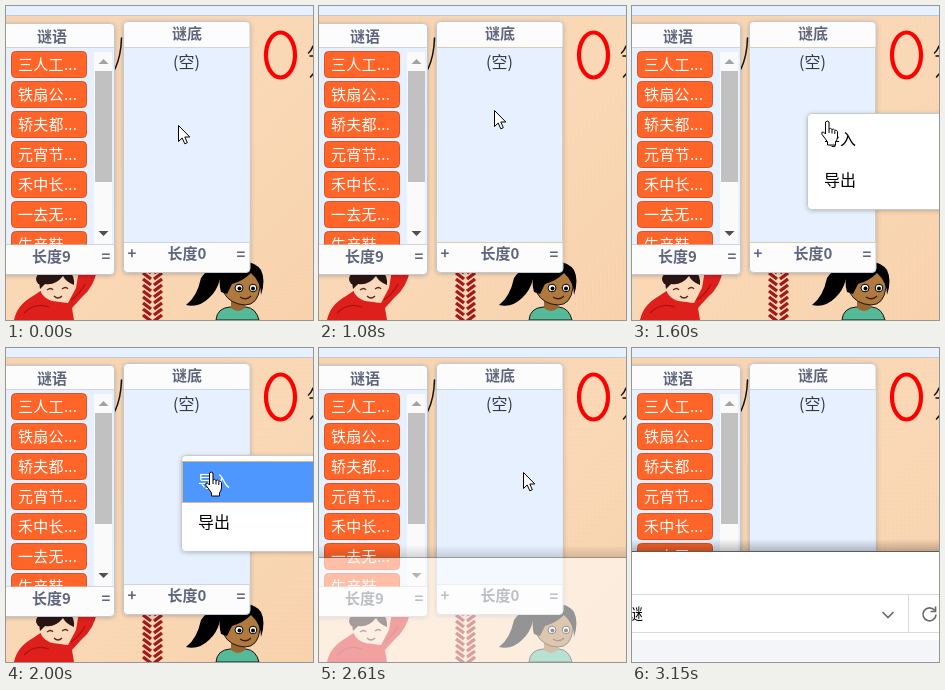
Recreate the animation shown at these times as an HTML page. Size 307x314 px, loop 8000 ms.

```html
<!DOCTYPE html>
<html lang="zh-CN">
<head>
<meta charset="utf-8">
<title>列表导入</title>
<style>
html, body { margin: 0; width: 100%; height: 100%; overflow: hidden; }
svg { display: block; width: 307px; height: 314px; }
text { font-family: "Noto Sans CJK SC", "Noto Sans CJK", "Liberation Sans", sans-serif; }
.title { font-size: 15px; font-weight: 700; fill: #5f667c; text-anchor: middle; }
.item { font-size: 15px; fill: #fff; letter-spacing: .3px; }
.menu { font-size: 16px; }
</style>
</head>
<body>
<svg viewBox="0 0 307 314" xmlns="http://www.w3.org/2000/svg">
  <defs>
    <linearGradient id="paper" x2="1" y2="1">
      <stop offset="0" stop-color="#f8d5b1"/>
      <stop offset=".55" stop-color="#fad9b8"/>
      <stop offset="1" stop-color="#f8d3ae"/>
    </linearGradient>
    <pattern id="weave" width="4" height="4" patternUnits="userSpaceOnUse">
      <path d="M0 .5H4M.5 0V4" stroke="#e9b98d" stroke-opacity=".08"/>
    </pattern>
    <linearGradient id="shade" x2="0" y2="1">
      <stop offset="0" stop-opacity="0"/>
      <stop offset="1" stop-opacity=".26"/>
    </linearGradient>
    <filter id="soft" x="-10%" y="-10%" width="120%" height="120%">
      <feDropShadow dx="0" dy="1" stdDeviation="2" flood-opacity=".22"/>
    </filter>
    <clipPath id="list"><rect y="42" width="108" height="196.5"/></clipPath>
  </defs>

  <rect width="307" height="314" fill="url(#paper)"/>
  <rect width="307" height="314" fill="url(#weave)"/>
  <rect width="307" height="9" fill="#e6f0ff"/>
  <path d="M0 9.5H307" stroke="#c3c8d2"/>

  <path d="M115.500 32Q115 50 109 63M307 40Q305 45 302.500 47M307 50H304M307 68L304.500 71"
    fill="none" stroke="#15110f" stroke-width="1.500" stroke-linecap="round"/>
  <ellipse cx="274.500" cy="49" rx="14.500" ry="22.500" fill="none" stroke="#f00" stroke-width="4.200"/>

  <!-- child in red -->
  <g>
    <path d="M8 314Q11 299 27 290L36 284Q42 296 62 297L70 282 73 264H91Q88 281 76 291L66 302 68 314Z" fill="#df1f1b"/>
    <ellipse cx="51" cy="281" rx="17" ry="14.500" fill="#fbd9bd"/>
    <path d="M34 283Q31 268 42 263H62Q69 270 68 279Q60 276 57 270Q49 280 39 278Z" fill="#2a1512"/>
    <circle cx="36" cy="273" r="6" fill="#2a1512"/>
    <path d="M41 284q4-3 6 0M56 283q4-3 6 0M48 290q4 4 8 0" fill="none" stroke="#5a2a1c" stroke-width="1.300"/>
    <path d="M18 307Q29 296 43 301M65 294Q74 288 79 278" fill="none" stroke="#a5140f" stroke-width="1.200"/>
  </g>

  <g id="braid" fill="none" stroke="#a01a1c" stroke-width="3.400"></g>

  <!-- girl -->
  <g>
    <path d="M219 264Q202 260 195 272Q191 291 180 299Q193 302 203 292Q211 285 214 273L222 277Z"/>
    <path d="M210 314Q211 302 224 301H240Q250 302 253 314Z" fill="#55ba98" stroke="#1b1512"/>
    <path d="M225 293L225 302Q232 308 239 302V296Z" fill="#996631"/>
    <path d="M217 276Q222 261 239 262Q255 266 254 281Q252 299 239 299Q224 298 218 287Z" fill="#b07a3f" stroke="#1b1512"/>
    <path d="M215 286Q209 264 228 258Q246 252 255 264Q260 274 255 289Q255 276 245 267Q237 275 226 278L221 288Z"/>
    <ellipse cx="233" cy="282" rx="4" ry="3.800" fill="#fff" stroke="#000"/>
    <ellipse cx="247" cy="282" rx="3.800" ry="3.800" fill="#fff" stroke="#000"/>
    <circle cx="233.500" cy="282.500" r="2"/>
    <circle cx="247" cy="282.500" r="2"/>
    <path d="M234 291q6 4 11-1" fill="none" stroke="#3c1c10" stroke-width="1.300"/>
  </g>

  <!-- left list -->
  <g>
    <rect x="-6" y="17.500" width="114.500" height="251" rx="4" fill="#fcfcfd" stroke="#bfc9d8" filter="url(#soft)"/>
    <rect y="42" width="108" height="196.500" fill="#e6f0ff"/>
    <path d="M0 41.500H108M0 238.500H108" stroke="#cdd5e1"/>
    <g id="items" clip-path="url(#list)"></g>
    <rect x="88" y="46" width="18" height="192" fill="#fafafa"/>
    <rect x="89" y="65" width="17" height="111" fill="#c1c1c1"/>
    <path d="M92.500 58L97.500 53 102.500 58Z" fill="#a3a3a3"/>
    <path d="M92.500 225L97.500 230 102.500 225Z" fill="#505050"/>
    <text class="title" x="46" y="35.500">谜语</text>
    <text class="title" x="45.500" y="256">长度9</text>
    <text class="title" x="100" y="256">=</text>
  </g>

  <!-- right list -->
  <g>
    <rect x="117.500" y="15.500" width="126.500" height="251" rx="4" fill="#fcfcfd" stroke="#bfc9d8" filter="url(#soft)"/>
    <rect x="118" y="42" width="125.500" height="194.500" fill="#e6f0ff"/>
    <path d="M118 41.500H243.500M118 236.500H243.500" stroke="#cdd5e1"/>
    <rect id="focus" x="117.500" y="41.500" width="126" height="195" fill="none" stroke="#d8cfb0"/>
    <text class="title" x="181" y="32.500">谜底</text>
    <text x="180.500" y="62" font-size="16" fill="#353a45" text-anchor="middle">(空)</text>
    <text class="title" x="126" y="252.500">+</text>
    <text class="title" x="181" y="252.500">长度0</text>
    <text class="title" x="235" y="253.500">=</text>
  </g>

  <!-- context menu -->
  <g id="menu">
    <rect x="175.500" y="107.500" width="150" height="96" rx="4" fill="#fff" stroke="#c6c9cf" filter="url(#soft)"/>
    <rect id="hover" x="176.500" y="113.500" width="150" height="41" fill="#4d97ff" stroke="#d9b98a"/>
    <g id="labels" class="menu">
      <text id="first" x="192" y="139">导入</text>
      <text x="192" y="180">导出</text>
    </g>
  </g>

  <!-- file dialog -->
  <g id="dialog">
    <rect y="-13" width="307" height="13" fill="url(#shade)"/>
    <rect width="307" height="130" fill="#fff"/>
    <path d="M0 -.5H307" stroke="#5c5c5c"/>
    <g id="bar">
      <path d="M0 42.500H307M0 80.500H307M276.500 43V80" stroke="#d9d9d9"/>
      <rect y="88" width="307" height="40" fill="#f3f5f8"/>
      <text x="-4" y="67" font-size="15">谜</text>
      <g fill="none" stroke="#6a6a6a" stroke-width="1.700">
        <path d="M250.500 60L256 65.500 261.500 60"/>
        <path d="M302.500 58.200A6.500 6.500 0 1 0 304 62.500M303.500 54.500V59.500H298.500"/>
      </g>
    </g>
  </g>

  <g fill="#fff" stroke="#000" stroke-linejoin="round">
    <path id="arrow" d="M.5 .5V16.500L4.200 13 6.800 18.800 9.300 17.700 6.800 12H11.800Z"/>
    <g id="hand">
      <path d="M4.500 2Q6.200 0 8 2V9Q9.500 7.500 11 9.500Q12.700 8.300 13.800 10.300Q15.500 9.500 16.500 11.500V17Q16 20 14.500 22V25H6.500V22Q4 18 1 14.500Q0 11.500 2.500 12L4.500 14Z"/>
      <path d="M8 9V13M11 10V13.500M13.800 11V14" fill="none"/>
    </g>
  </g>
</svg>
<script>
const LOOP = 8000;
const $ = id => document.getElementById(id);
const el = Object.fromEntries(
  ["focus", "menu", "hover", "labels", "first", "dialog", "bar", "arrow", "hand"].map(id => [id, $(id)]));

$("items").innerHTML = ["三人工", "铁扇公", "轿夫都", "元宵节", "禾中长", "一去无", "生产鞋"].map((s, i) =>
  `<rect x="5.500" y="${45.5 + i * 30}" width="75" height="26" rx="4" fill="#ff6428" stroke="#dc5324"/>
   <text class="item" x="12" y="${64 + i * 30}">${s}...</text>`).join("");

let braid = "";
for (let y = 264; y < 318; y += 6) braid += `M137 ${y - 3}L145 ${y + 3}M156 ${y - 3}L148 ${y + 3}`;
$("braid").innerHTML = `<path d="${braid}"/>`;

// each step changes only the listed properties
const steps = [
  { at: 0, cursor: "arrow", x: 172, y: 119, focus: 0, menu: 0, labels: 0, hover: 0, dialog: 0, top: 210, bar: 0 },
  { at: 400, x: 175, y: 104 },
  { at: 1080, focus: 1 },
  { at: 1200, menu: 1, labels: .6 },
  { at: 1350, labels: 1 },
  { at: 1600, cursor: "hand", x: 189, y: 114 },
  { at: 1720, x: 199, y: 123, hover: 1 },
  { at: 2000, focus: 0 },
  { at: 2150, menu: .4, cursor: "arrow", x: 204, y: 124 },
  { at: 2300, menu: 0, hover: 0 },
  { at: 2610, dialog: .58 },
  { at: 2760, dialog: .92, top: 206, bar: 1 },
  { at: 2880, dialog: 1, top: 204 },
  { at: 3000, x: 182, y: 182 },
  { at: 3150, cursor: "" }
];

function draw(now) {
  const t = now % LOOP;
  const s = Object.assign({}, ...steps.filter(step => step.at <= t));
  for (const key of ["focus", "menu", "labels", "hover", "dialog", "bar"]) el[key].setAttribute("opacity", s[key]);
  el.first.setAttribute("fill", s.hover ? "#fff" : "#000");
  el.dialog.setAttribute("transform", `translate(0 ${s.top})`);
  for (const kind of ["arrow", "hand"]) {
    el[kind].setAttribute("opacity", +(s.cursor === kind));
    el[kind].setAttribute("transform", `translate(${s.x} ${s.y})`);
  }
}

const start = performance.now();
function tick() {
  draw(performance.now() - start);
  requestAnimationFrame(tick);
}
tick();
</script>
</body>
</html>
```
